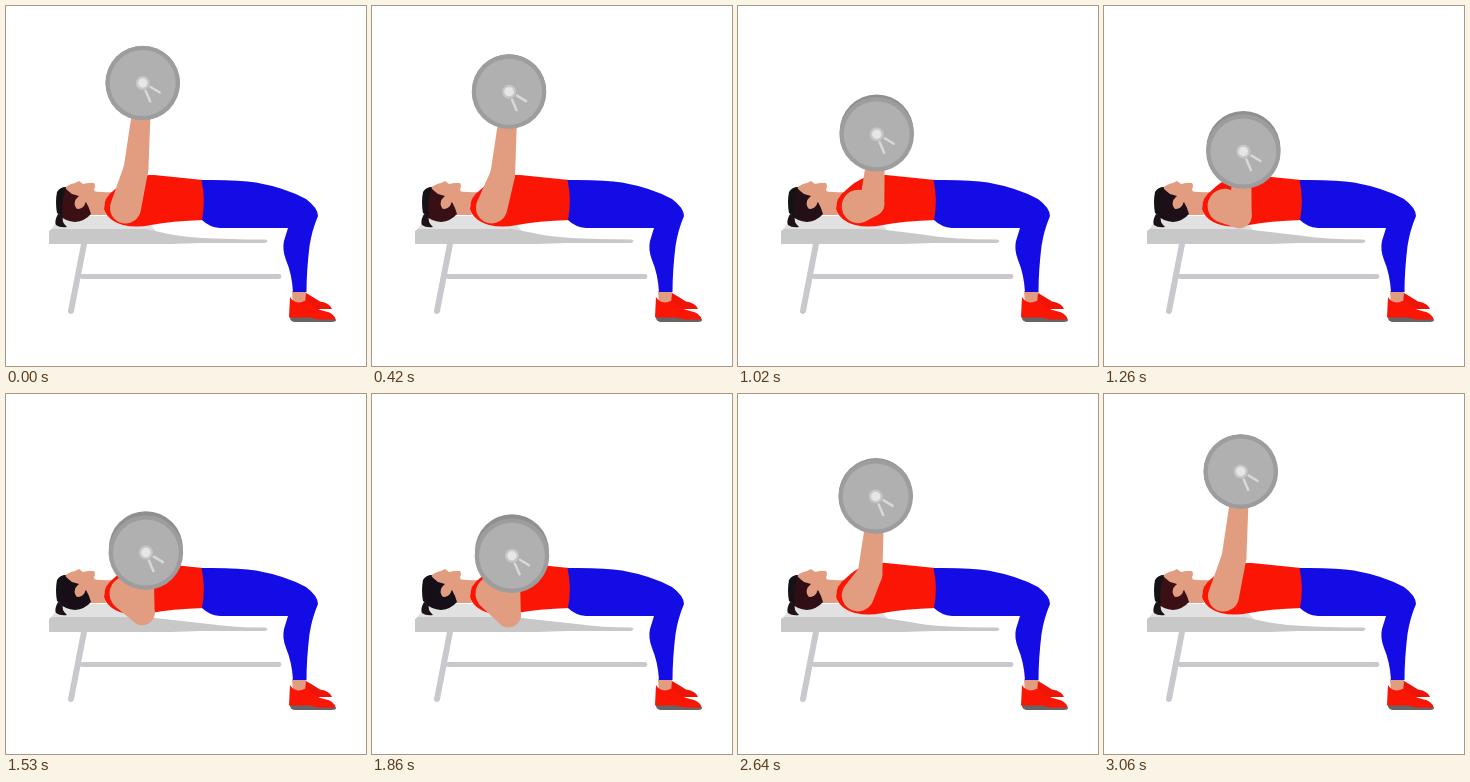
An HTML page with a canvas that plays this animation: 360 by 360 pixels, repeating every 3120 ms.

```html
<!DOCTYPE html>
<html lang="en">
<head>
<meta charset="utf-8">
<title>Bench press</title>
<style>
html, body { margin: 0; width: 100%; height: 100%; overflow: hidden; background: #fff; }
canvas { display: block; width: 100vmin; height: 100vmin; }
</style>
</head>
<body>
<canvas id="stage" width="360" height="360"></canvas>
<script>
const ctx = document.getElementById('stage').getContext('2d');
const LOOP = 3120;
const SKIN = '#e29d80', RED = '#fb1505', BLUE = '#130ce4';

const shapes = {
  benchTop: 'M55 210H136L150 225H44Z',
  torso: 'M98 203Q98 191 107 185Q117 175 128 171Q138 168.5 148 169L197 174Q201 195 198 214Q165 215 145 219Q130 222 117 219Q101 214 98 203Z',
  pants: 'M195.5 174Q232 173.5 250 176.5Q280 182 300 193Q312 202 312 210Q306 224 303.5 240Q300.5 265 300.5 286H287Q286 268 280 254Q276 243 278 235L282 222H214Q203 221 196 214Q200 194 195.5 174Z',
  neck: 'M82 184Q94 187 106 186Q98 192 98 203L100 209H84L76 198Z',
  face: 'M57 183Q63 178 69 177L73 175L77 178L82 177L88 177Q90 180 88 183Q90 187 86 190L84 207L68 206L59 192Z',
  hair: 'M58 181Q62 185 66 188L73 190Q68 194 69 199Q72 203 77 200L80 196Q83 201 85 208Q79 215 69 216Q59 215 54 210L54 186Z',
  band: 'M60 181Q54 181 51 186Q49 196 51 207L57 211Q55 198 58 188Z',
  tail: 'M52 208Q48 215 50 219Q54 222 61 221Q55 216 57 209Z',
  ear: 'M70 193Q67 199 71 203Q77 203 79 198L76 193Z',
  ankle: 'M286 285L300 284L301 298H287Z',
  backShoe: 'M300 287Q307 291 314 295.5Q324 297 326 303H306L299 298Z',
  frontShoe: 'M284 291Q288 298 296 296Q301 293 303 297Q309 303 318 305Q329 307 330 314.5H287L283 311Z',
  sole: 'M284 311.5H304L312 313.5H330Q330 316 326 316H288Q284 315 284 311.5Z'
};
for (const k in shapes) shapes[k] = new Path2D(shapes[k]);

const mix = (a, b, p) => a + (b - a) * p;

function fill(path, color) {
  ctx.fillStyle = color;
  ctx.fill(path);
}

function disc(x, y, r, color) {
  ctx.fillStyle = color;
  ctx.beginPath();
  ctx.arc(x, y, r, 0, Math.PI * 2);
  ctx.fill();
}

function line(x1, y1, x2, y2, w, color) {
  ctx.strokeStyle = color;
  ctx.lineWidth = w;
  ctx.lineCap = 'round';
  ctx.beginPath();
  ctx.moveTo(x1, y1);
  ctx.lineTo(x2, y2);
  ctx.stroke();
}

// Tapered capsule around two circles
function limb(a, b, color) {
  const dx = b.x - a.x, dy = b.y - a.y;
  const dir = Math.atan2(dy, dx);
  const open = Math.acos((a.r - b.r) / Math.hypot(dx, dy));
  ctx.fillStyle = color;
  ctx.beginPath();
  ctx.arc(a.x, a.y, a.r, dir + open, dir - open + Math.PI * 2);
  ctx.arc(b.x, b.y, b.r, dir - open, dir + open);
  ctx.closePath();
  ctx.fill();
}

// 0 = arms straight, 1 = bar at the chest
function depth(t) {
  const ease = (from, to) => {
    const u = Math.min(1, Math.max(0, (t - from) / (to - from)));
    return (1 - Math.cos(Math.PI * u)) / 2;
  };
  return t < 1780 ? ease(75, 1745) : 1 - ease(1817, 3120);
}

// Picture cadence: one 60 ms hold, then four of 30 ms
function snap(t) {
  const r = t % 180;
  return t - r + (r < 60 ? 0 : Math.floor(r / 30) * 30);
}

function drawBench(p) {
  line(78, 238, 65, 305, 6, '#c9c9cd');
  line(76, 270.5, 273, 270.5, 4.8, '#c9c9cd');
  fill(shapes.benchTop, '#e1e1e1');
  const k = mix(158, 205, p);
  ctx.fillStyle = '#c8c8c8';
  ctx.beginPath();
  ctx.moveTo(43, 225);
  ctx.lineTo(46, 223);
  ctx.lineTo(140, 223);
  ctx.lineTo(k, mix(227, 230, p));
  ctx.quadraticCurveTo(k + 25, 233.5, 259, 233.5);
  ctx.quadraticCurveTo(264, 235, 259, 237);
  ctx.lineTo(195, 237);
  ctx.lineTo(165, 238);
  ctx.lineTo(43, 238);
  ctx.fill();
}

function drawBody(p) {
  fill(shapes.ankle, SKIN);
  fill(shapes.backShoe, '#ee1408');
  fill(shapes.frontShoe, RED);
  fill(shapes.sole, '#696363');
  fill(shapes.neck, SKIN);
  fill(shapes.face, SKIN);
  const tone = [mix(58, 22, p), mix(16, 14, p), mix(20, 24, p)].map(Math.round);
  fill(shapes.hair, `rgb(${tone})`);
  fill(shapes.ear, SKIN);
  fill(shapes.band, '#151216');
  fill(shapes.tail, '#1d1217');
  fill(shapes.torso, RED);
  fill(shapes.pants, BLUE);
}

function drawArm(p, x, y) {
  const shoulder = { x: mix(119.5, 121, p), y: mix(202, 199.5, p), r: mix(15.5, 17.5, p) };
  const elbow = { x: mix(130, 136.5, p), y: mix(163, 221, p), r: 12.4 };
  const hand = { x: x - 1, y: y + 25, r: 9 };
  limb(shoulder, elbow, SKIN);
  if (elbow.y - hand.y > 5) limb(elbow, hand, SKIN);
}

function drawPlate(p, x, y) {
  disc(x, y - 4.5 * p, 37, '#8f8f8f');
  disc(x, y, 37.3, '#9d9d9d');
  disc(x, y, 33, '#b0b0b0');
  line(x + 3, y + 8, x + 7.5, y + 18.5, 2.5, '#d8d8d8');
  line(x + 8, y + 4, x + 17, y + 9.5, 2.5, '#d8d8d8');
  disc(x, y, 7, '#c6c6c6');
  disc(x, y, 4.7, '#e6e6e6');
}

function frame(now) {
  const p = depth(snap((now - start) % LOOP));
  const x = mix(136.7, 140, p), y = mix(77, 162, p);
  ctx.fillStyle = '#fff';
  ctx.fillRect(0, 0, 360, 360);
  drawBench(p);
  drawBody(p);
  drawArm(p, x, y);
  drawPlate(p, x, y);
}

const start = performance.now();
function loop() {
  frame(performance.now());
  requestAnimationFrame(loop);
}
loop();
</script>
</body>
</html>
```
